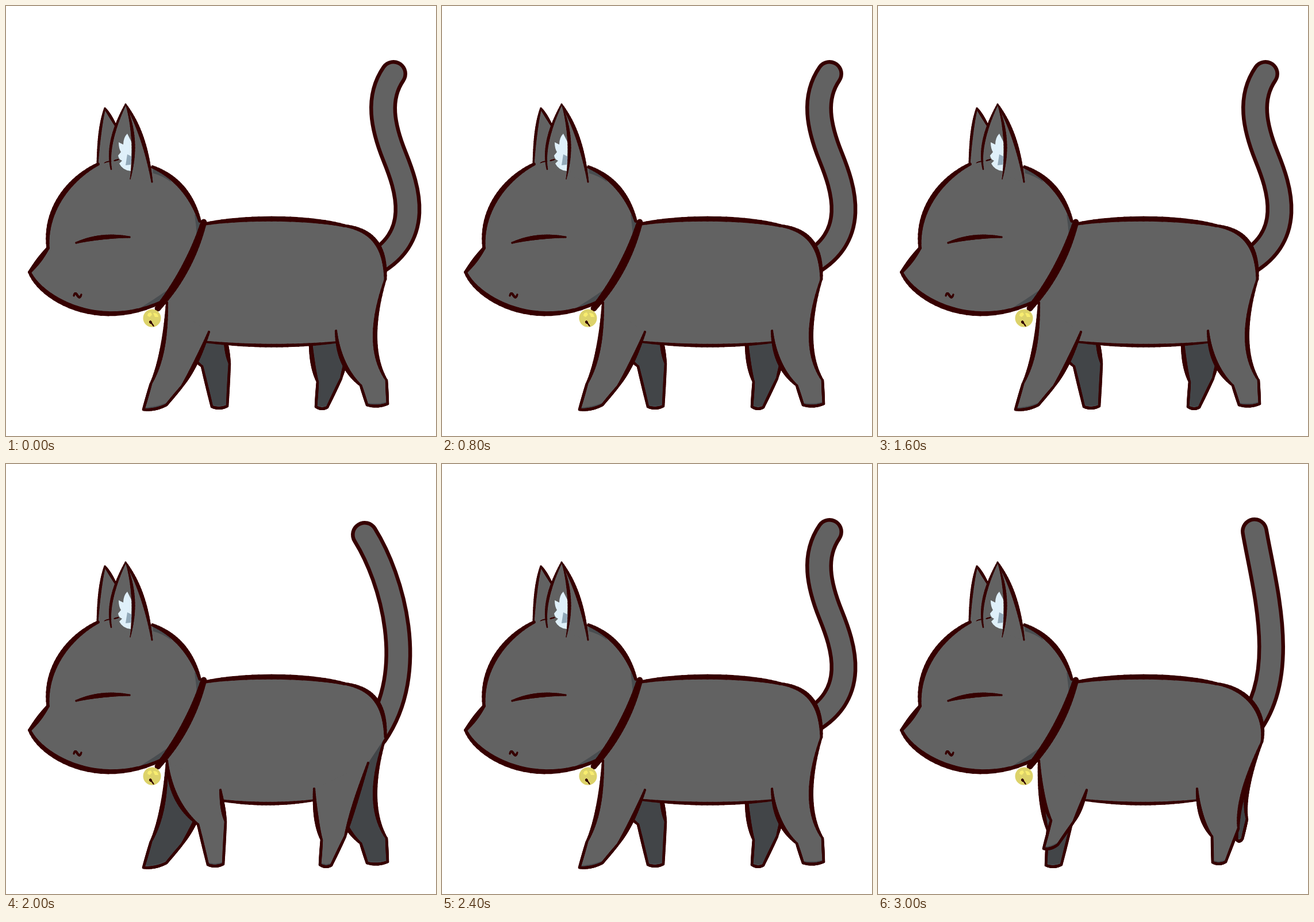
An HTML page with a canvas that plays this animation: 748 px wide and 748 px high, repeating every 3.2 s.

```html
<!DOCTYPE html>
<html lang="en">
<head>
<meta charset="utf-8">
<title>Walking cat</title>
<style>
html, body { margin: 0; width: 100%; height: 100%; overflow: hidden; background: #fff; }
canvas { display: block; }
</style>
</head>
<body>
<canvas id="stage" width="748" height="748"></canvas>
<script>
const ctx = document.getElementById('stage').getContext('2d');
const INK = '#360000', FUR = '#626262', DARK = '#424548', SHADE = '#494d50';
const STEP = 200;
ctx.lineCap = ctx.lineJoin = 'round';

// Lower leg outlines through one walk cycle: front ankle, paw corners, back ankle.
const FRONT_PAWS = [
  [252, 657, 239, 702, 279, 694, 305, 663],
  [295, 637, 292, 698, 319, 697, 337, 625],
  [334, 627, 351, 697, 378, 696, 382, 622],
  [301, 620, 288, 669, 313, 662, 340, 623]
];
const HIND_PAWS = [
  [617, 660, 628, 694, 664, 692, 662, 651],
  [624, 630, 624, 654, 634, 652, 642, 618],
  [549, 654, 546, 697, 566, 698, 590, 648],
  [581, 648, 582, 693, 605, 692, 627, 634]
];
const SWAY = 'M655 117C672 215 718 370 640 462';
const TAILS = [
  'M674 118C645 160 655 210 676 262S730 405 630 453', SWAY,
  'M624 123C672 200 718 360 642 470', SWAY
];

const wave = phase => Math.round(Math.cos(phase * Math.PI / 2));

// Samples a Bezier curve of any degree, given as x, y, x, y, ...
function curve(...coords) {
  return Array.from({ length: 25 }, (_, i) => {
    let p = coords;
    while (p.length > 2) p = p.slice(0, -2).map((v, j) => v + (p[j + 2] - v) * i / 24);
    return p;
  });
}

// Inks a line that is full in the middle and thinner at both ends.
function ink(points, width, ends = 0.6, color = INK) {
  ctx.strokeStyle = color;
  for (let i = 1; i < points.length; i++) {
    const t = (i - 0.5) / (points.length - 1);
    ctx.lineWidth = width * (ends + (1 - ends) * Math.sin(Math.PI * t));
    ctx.beginPath();
    ctx.moveTo(...points[i - 1]);
    ctx.lineTo(...points[i]);
    ctx.stroke();
  }
}

function fillPoints(color, ...parts) {
  ctx.fillStyle = color;
  ctx.beginPath();
  parts.flat().forEach(p => ctx.lineTo(...p));
  ctx.fill();
}

function fillPath(color, path) {
  ctx.fillStyle = color;
  ctx.fill(new Path2D(path));
}

function drawTail(phase) {
  const path = new Path2D(TAILS[phase]);
  for (const [color, width] of [[INK, 48], [FUR, 35]]) {
    ctx.strokeStyle = color;
    ctx.lineWidth = width;
    ctx.stroke(path);
  }
}

function thigh([hx, hy], ax, ay, pull, bow) {
  return curve(hx, hy, hx + pull * (ax - hx) - bow, hy + 0.65 * (ay - hy), ax, ay);
}

function drawLeg(color, paw, left, right, bow) {
  const [ax, ay, bx, by, cx, cy, dx, dy] = paw;
  const sole = lift => curve(bx, by - lift, (bx + cx) / 2, (by + cy) / 2 + 6 - lift, cx, cy - lift);
  const edges = [thigh(left, ax, ay, 0.1, 0), curve(ax, ay, bx, by), sole(0),
    curve(cx, cy, dx, dy), thigh(right, dx, dy, 0.5, bow).reverse()];
  fillPoints(color, ...edges);
  ink(sole(3), 3, 0.6, SHADE);
  edges.forEach((edge, i) => ink(edge, i % 4 ? 5 : 8, i % 4 ? 0.9 : 0.5));
}

const chest = [280, 516];
const frontHip = phase => [363 - 10 * wave(phase), 567];
const hindHip = phase => [555 + 19 * wave(phase), 565];

function drawFront(color, phase) {
  drawLeg(color, FRONT_PAWS[phase], chest, frontHip(phase), 0);
}

function drawHind(color, phase, rump) {
  const top = phase === 2 ? [630, 520] : rump;
  drawLeg(color, HIND_PAWS[phase], hindHip(phase), top, 23 + 15 * wave(phase));
}

function drawBody(phase) {
  const opposite = (phase + 2) % 4;
  const stretch = phase % 2 * 8;
  const rump = [660 + stretch, 475 + stretch];
  const tuck = 7 * Math.max(0, wave(phase));

  ctx.save();
  ctx.translate(tuck, 0);
  drawFront(DARK, opposite);
  ctx.translate(-2 * tuck, 0);
  drawHind(DARK, opposite, rump);
  ctx.restore();

  const front = frontHip(phase)[0], hind = hindHip(phase)[0];
  const back = curve(346, 379, 420, 366, 530, 368, 588, 382);
  const rear = curve(588, 382, 644, 390, 660 + 2 * stretch, 425 + stretch, ...rump);
  const belly = curve(hind, 585, (front + hind) / 2, 597, front - 8, 584);
  fillPoints(FUR, back, rear, [[630, 520]], belly, [chest]);
  ink(belly, 6);
  drawHind(FUR, phase, rump);
  drawFront(FUR, phase);
  ink(back, 9);
  ink(rear, 8);
}

function drawHead() {
  const farEar = [curve(159, 276, 162, 210, 172, 178), curve(172, 178, 180, 188, 193, 212)];
  fillPoints(FUR, ...farEar, [[185, 276]]);
  farEar.forEach(edge => ink(edge, 5));

  const collar = curve(344, 376, 320, 459, 264, 526);
  const outline = [
    curve(337, 374, 316, 305, 255, 280),
    curve(160, 275, 109, 301, 67, 355, 73, 421),
    curve(73, 421, 58, 442, 41, 463),
    curve(41, 463, 60, 508, 160, 567, 270, 515)
  ];
  fillPoints(FUR, ...outline, [...collar].reverse());
  fillPath(SHADE, 'M255 282L256 291Q272 295 287 306L283 293Z');
  fillPath(SHADE, 'M328 362L340 374L332 402Q331 382 328 362Z');
  fillPath(SHADE, 'M234 525Q258 510 281 494L270 517Z');
  outline.forEach(edge => ink(edge, 9));

  const nearEar = [
    curve(183, 284, 176, 250, 188, 210, 208, 171),
    curve(208, 171, 242, 222, 254, 306)
  ];
  fillPoints(FUR, ...nearEar);
  fillPath('#dff0fa', 'M211 222Q204 229 204 241L196 237Q196 248 200 254L195 260Q196 267 202 269L197 274Q203 286 217 287L219 238Z');
  fillPath('#91a8b8', 'M211 258L208 277L217 276L219 262Z');
  ink(nearEar[0], 5, 0.5);
  ink(nearEar[1], 7, 0.4);
  ink(curve(209, 173, 230, 235, 216, 301), 6, 0.2);
  ink(curve(171, 273, 177, 270, 183, 270), 1.5);
  ink(curve(188, 269, 196, 267), 2);

  ink(curve(122, 412, 165, 398, 215, 402), 8, 0.4);
  ink(curve(118, 504, 122, 490, 126, 517, 131, 502), 4, 0.8);
  ink(collar, 14, 0.75);
}

function drawBell() {
  ctx.fillStyle = '#dcd26a';
  ctx.beginPath();
  ctx.arc(254, 543, 15.5, 0, Math.PI * 2);
  ctx.fill();
  fillPath('#f8ed70', 'M246 539Q246 533 252 533L254 537L250 541ZM256 534Q264 533 265 541L259 541Z');
  ink(curve(251, 549, 252, 551), 4);
  ink(curve(252, 550, 257, 557), 2);
}

const start = performance.now();
function tick() {
  const elapsed = Math.max(0, performance.now() - start);
  const phase = Math.floor(elapsed / STEP) % 4;
  ctx.fillStyle = '#fff';
  ctx.fillRect(0, 0, 748, 748);
  drawTail(phase);
  drawBody(phase);
  drawHead();
  drawBell();
  requestAnimationFrame(tick);
}
tick();
</script>
</body>
</html>
```
